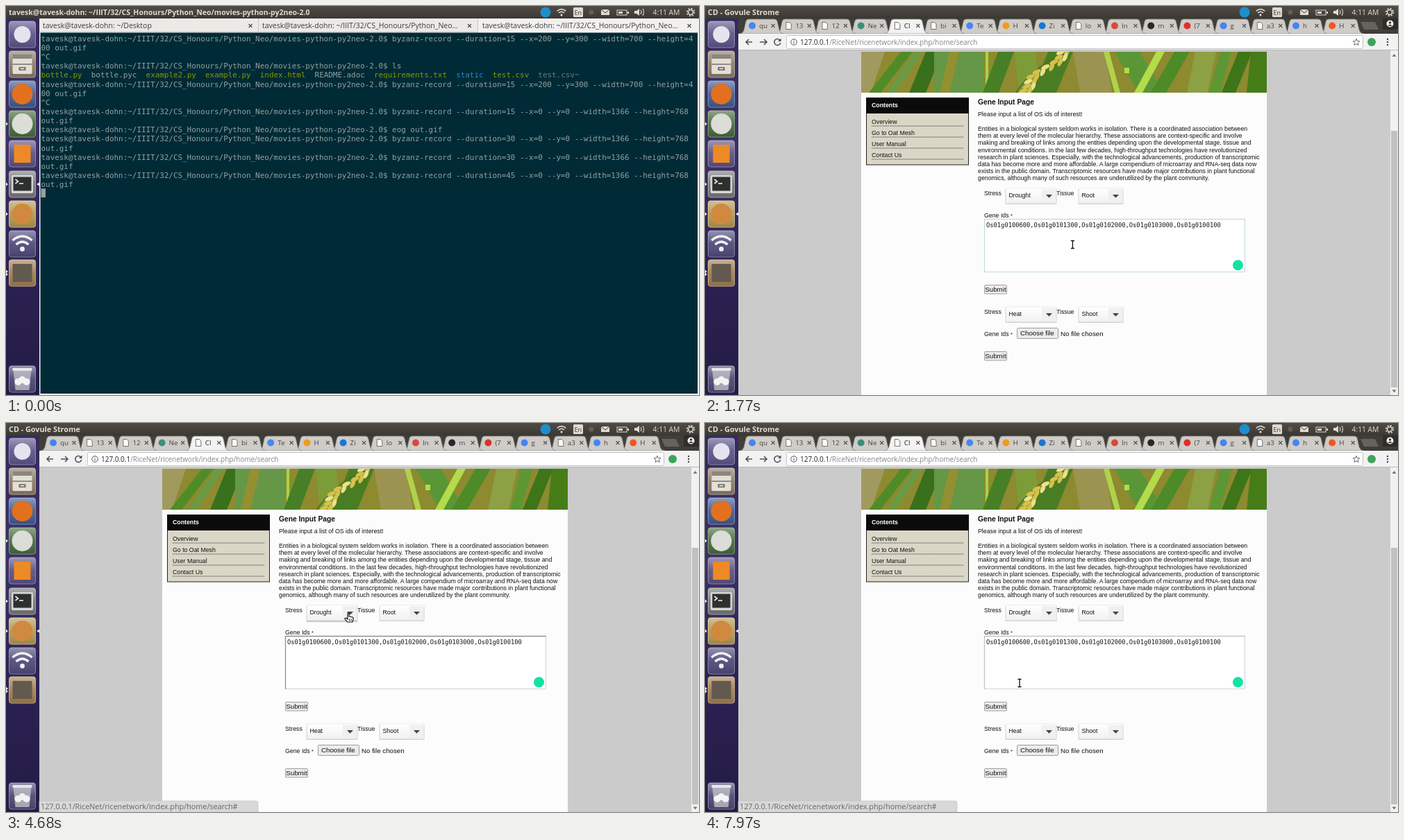
Recreate the animation shown at these times as an HTML page. Size 998 px wide and 561 px high, loop 8000 ms.

```html
<!DOCTYPE html>
<html lang="en">
<head>
<meta charset="utf-8">
<title>Gene input demo</title>
<style>
html, body { margin: 0; width: 100%; height: 100%; overflow: hidden; background: #cbcbcb; }
svg { display: block; width: 998px; height: 561px; }
text { white-space: pre; }
.ui { font-family: "Open Sans", "Noto Sans", sans-serif; }
.page { font-family: "Liberation Sans", Arial, sans-serif; }
.mono { font-family: "DejaVu Sans Mono", monospace; }
.b { font-weight: 700; }
</style>
</head>
<body>
<svg id="stage" viewBox="0 0 998 561" xmlns="http://www.w3.org/2000/svg"></svg>
<script>
const LOOP = 8000;
const rect = (x, y, w, h, fill, more = '') => `<rect x="${x}" y="${y}" width="${w}" height="${h}" fill="${fill}" ${more}/>`;
const circle = (x, y, r, fill, more = '') => `<circle cx="${x}" cy="${y}" r="${r}" fill="${fill}" ${more}/>`;
const path = (d, fill, more = '') => `<path d="${d}" fill="${fill}" ${more}/>`;
const line = (d, color, w = 1, more = '') => path(d, 'none', `stroke="${color}" stroke-width="${w}" ${more}`);
const text = (x, y, s, size, fill, cls, more = '') => `<text x="${x}" y="${y}" font-size="${size}" fill="${fill}" class="${cls}" ${more}>${s}</text>`;
const group = (inner, more = '') => `<g ${more}>${inner}</g>`;
const clamp = v => Math.max(0, Math.min(1, v));
const within = (t, spans) => spans.some(([a, b]) => t >= a && t < b);

const gradient = (id, ...stops) => `<linearGradient id="${id}" x2="0" y2="1">` +
  stops.map((c, i) => `<stop offset="${i / (stops.length - 1)}" stop-color="${c}"/>`).join('') + '</linearGradient>';
const defs = `<defs>
  ${gradient('bar', '#504c45', '#3b3833')}
  ${gradient('dock', '#352a5c', '#3c3166', '#2b2152', '#241c46')}
  ${gradient('gloss', '#ffffff66', '#ffffff10', '#00000022')}
  ${gradient('btn', '#ffffff', '#f1f1f1')}
  <linearGradient id="glass"><stop offset="0" stop-color="#4d675c"/><stop offset=".13" stop-color="#4d675c"/><stop offset=".14" stop-color="#527594"/><stop offset=".91" stop-color="#527594"/><stop offset=".92" stop-color="#4d675c"/></linearGradient>
  <clipPath id="banner">${rect(225, 66, 584, 59, '#000')}</clipPath></defs>`;

const wifiArcs = (x, y, s, color) => group(
  line('M-7 -3Q0 -9 7 -3M-4.5 0Q0 -4 4.5 0', color, 1.7) + circle(0, 3.2, 1.7, color),
  `transform="translate(${x} ${y}) scale(${s})"`);

// Dock icons, drawn around the origin in a 40 px tile
const icons = {
  home: circle(0, 0, 12, '#e6e3ee'),
  files: rect(-14, -14, 28, 28, '#e4dfd6', 'rx="2"') + rect(-14, -14, 28, 6, '#8c867c') +
    line('M-14 0H14', '#77736c', 1.5) + rect(-5, 4, 10, 5, '#6d6861', 'rx="1"') + rect(-3, 5.5, 6, 2, '#e4dfd6'),
  fox: circle(0, 0, 15, '#e2701f'),
  update: circle(0, 0, 15, '#dcdcd8'),
  cone: rect(-12, -13, 24, 26, '#ee8a25'),
  term: rect(-15.5, -13, 31, 26, '#d6d8d6', 'rx="2"') + rect(-13, -10.5, 26, 20, '#2d302f') +
    line('M-10 -7l4 3l-4 3M-4.5 -1h6', '#f4f4f4', 1.6),
  web: circle(0, 0, 15, '#cf8a3f'),
  wifi: wifiArcs(0, 1, 2, '#f1f1f4'),
  edit: rect(-14, -13, 28, 26, '#625a4e'),
  trash: path('M-13 -13H13L10 16H-10Z', '#c4c6cc', 'opacity=".75"') + rect(-14, -16, 28, 4, '#e6e7ea', 'rx="1"') +
    [-6, 0, 6].map(x => circle(x, 1 + Math.abs(x) / 2, 5, '#f3f3f3')).join('')
};
const icon = (name, x, y, s = 1) => group(icons[name], `transform="translate(${x} ${y}) scale(${s})"`);

const dockItems = [['home', 41, '#5a5488'], ['files', 84, '#8a7a66'], ['fox', 127, '#3f5a92'], ['update', 170, '#46693c'],
  ['cone', 213, '#5b5183'], ['term', 257, '#77777a'], ['web', 300, '#b29752'], ['wifi', 343, '#4d4979'],
  ['edit', 385, '#a07d4f'], ['trash', 538, '#4b4772']];
const dock = rect(0, 18, 48, 543, 'url(#dock)') + dockItems.map(([name, y, c]) =>
  rect(4, y - 19.5, 39, 39, c, 'rx="4"') + rect(4.5, y - 19, 38, 38, 'url(#gloss)', 'rx="4" stroke="#ffffff50"') + icon(name, 23.5, y)).join('') +
  [170, 257, 300, 383, 387].map(y => path(`M0 ${y - 2.5}L3 ${y}L0 ${y + 2.5}Z`, '#e8e8ee')).join('');

const tray = circle(777, 9, 7.5, '#1d8fcb') + wifiArcs(800, 10, .9, '#dfdbd2') + rect(817, 2, 14, 14, '#dfdbd2', 'rx="1.5"') +
  text(818.6, 12.8, 'En', 9, '#3b3833', 'ui') + circle(843, 9, 3.5, '#625e57') +
  rect(857, 5, 12, 8, '#dfdbd2') + line('M857 5l6 5l6 -5', '#3b3833') +
  rect(880, 6, 14, 7, 'none', 'stroke="#dfdbd2"') + rect(895, 8, 2, 3, '#dfdbd2') + rect(882, 8, 6, 3, '#dfdbd2') +
  path('M905 7h3l4 -3v10l-4 -3h-3Z', '#dfdbd2') + line('M914 6q2 3 0 6M917 4q3 5 0 10', '#dfdbd2', 1.1) +
  text(931.5, 13, '4:11 AM', 10.3, '#dfdbd2', 'ui') +
  circle(986, 9, 3.4, 'none', 'stroke="#dfdbd2" stroke-width="1.5"') + circle(986, 9, 5.3, 'none', 'stroke="#dfdbd2" stroke-width="1.8" stroke-dasharray="2 2.16"');

const cross = (x, y, c) => line(`M${x - 2.5} ${y - 2.5}l5 5m0 -5l-5 5`, c, 1.2);

// Terminal
const user = 'tavesk@tavesk-dohn:';
const folder = '~/IIIT/32/CS_Honours/Python_Neo/movies-python-py2neo-2.0';
const record = (s, x, y, w, h) => `$byzanz-record --duration=${s} --x=${x} --y=${y} --width=${w} --height=${h}`;
const full = s => [record(s, 0, 0, 1366, 768), 'out.gif'];
const small = [record(15, 200, 300, 700, 4), '00 out.gif', '^C'];
const GREEN = '#859900', GREY = '#93a1a1';
const listing = [['bottle.py', GREEN], ['bottle.pyc', GREY], ['example2.py', GREEN], ['example.py', GREEN], ['index.html', GREEN],
  ['README.adoc', GREY], ['requirements.txt', GREEN], ['static', '#268bd2'], ['test.csv', GREEN], ['test.csv~', '#657b83']]
  .map(([s, c]) => `<tspan fill="${c}">${s}</tspan>`).join('  ');
const shellLines = [...small, '$ls', listing, ...small, ...full(15), '$eog out.gif', ...full(30), ...full(30), ...full(45)];
const shellTab = (x, label, closeX) => text(x, 32, user + ' ' + label, 10.5, '#3c3c3c', 'ui') + cross(closeX, 28.5, '#4a4a4a');
const terminal = rect(48, 18, 950, 543, '#f2f1f0') + rect(48, 18, 315, 20, '#eceae7') + rect(364, 18, 315, 20, '#eceae7') +
  line('M363.5 18V38M679.5 18V38M48 37.5H680', '#c9c5bf') +
  shellTab(53, '~/Desktop', 352) + shellTab(369, '~/IIIT/32/CS_Honours/Python_Neo…', 667.5) + shellTab(686, '~/IIIT/32/CS_Honours/Python_Neo…', 984) +
  rect(49.5, 38.5, 946.5, 520.5, '#002b36') +
  shellLines.map((s, i) => text(50.5, 50.8 + i * 13.15, s.replace(/^\$/, `${user}${folder}$ `), 10.92, GREY, 'mono')).join('') +
  rect(50.5, 263.3, 6.5, 12.7, '#93a1a1', 'id="caret"') +
  text(4, 12.5, `${user} ${folder}`, 10.5, '#dfdbd2', 'ui b') + path('M48 254.5L44 257L48 259.5Z', '#e8e8ee');

// Browser window
const page = (x, y, s, more = '', size = 8.78) => text(x, y, s, size, '#111', 'page', more);
const tabLabels = ['qu', '13', '12', 'Ne', 'Cl', 'bi', 'Te', 'H', 'Zi', 'lo', 'In', 'm', '(7', 'g', 'a3', 'h', 'H'];
const tabMarks = ['#4285f4', '', '', '#3b8f7a', '', '', '#4688f1', '#f29a1f', '#1877d8', '', '#d9483b', '#24292e', '#e02f2f', '#4285f4', '', '#4285f4', '#f4561f'];
const favicon = (x, c) => c ? circle(x, 28.5, 5, c) :
  path(`M${x - 3.5} 23.5h5l2.5 2.5v7.5h-7.5Z`, '#fdfdfd', 'stroke="#666" stroke-width=".9"');
const tab = i => {
  const x = 53 + i * 52.2, on = i === 4;
  return path(`M${x - 3} 40Q${x + 1} 40 ${x + 3} 35L${x + 6} 22Q${x + 7} 19 ${x + 10} 19H${x + 47}Q${x + 50} 19 ${x + 51} 22L${x + 54} 35Q${x + 56} 40 ${x + 60} 40Z`,
    on ? '#f2f2f2' : '#cfccc8', 'stroke="#8b8985" stroke-width=".8"') + favicon(x + 15, tabMarks[i]) +
    text(x + 25, 32, tabLabels[i], 9.8, on ? '#222' : '#444', 'ui') + cross(x + 45, 28.5, '#555');
};
const order = [...tabLabels.keys()].filter(i => i !== 4).reverse().concat(4);
const address = '/RiceNet/ricenetwork/index.php/home/search';
const chromeBar = rect(48, 18, 950, 22, '#403e39') + order.map(tab).join('') + path('M944 23h21l5 11h-21Z', '#66635d') +
  rect(976, 18, 22, 16, '#2f2d2a') + circle(986.5, 25.5, 5, '#f1f1f1') + circle(986.5, 24, 1.7, '#333') + path('M983 28.8q3.5 -4 7 0Z', '#333') +
  rect(48, 40, 950, 24, '#f2f2f2') + line('M48 63.5H998', '#b9b9b9') + rect(117.5, 42.5, 830, 19, '#fff', 'rx="2" stroke="#c3c3c3"') +
  line('M68 52H59m4 -4l-4 4l4 4M79 52h10m-4 -4l4 4l-4 4', '#4e4e4e', 1.5) +
  line('M108 49.5a4.5 4.5 0 1 0 .7 3.5', '#4e4e4e', 1.5) + path('M109.5 46.5v4.5h-4.5Z', '#4e4e4e') +
  circle(128, 52, 4.3, 'none', 'stroke="#555"') + line('M128 51v3.5M128 49v1', '#555') +
  text(137, 55.5, `127.0.0.1<tspan fill="#858585">${address}</tspan>`, 9.98, '#222', 'ui') +
  path('M938 47.3l1.4 3.2l3.4 .3l-2.6 2.3l.8 3.4l-3 -1.8l-3 1.8l.8 -3.4l-2.6 -2.3l3.4 -.3Z', 'none', 'stroke="#666"') +
  circle(960, 52, 6, '#3fa35b') + [48, 52, 56].map(y => circle(983, y, 1.2, '#444')).join('');

// [top x, bottom x, width, colour] of each leaf in the banner
const leaves = [[225, 205, 34, '#a19a5e'], [282, 236, 17, '#4f8c28'], [302, 262, 12, '#6a9b44'], [318, 294, 24, '#39701c'],
  [330, 330, 72, '#659746'], [352, 338, 14, '#939032'], [404, 404, 4, '#a9d248'], [422, 400, 23, '#477f26'], [446, 452, 30, '#7c9c38'],
  [494, 470, 36, '#497d23'], [530, 540, 46, '#9b9450'], [574, 590, 8, '#b0d24b'], [590, 624, 36, '#5a9636'], [650, 618, 12, '#b4db4b'],
  [676, 642, 22, '#4c8b27'], [706, 694, 30, '#8ca044'], [742, 726, 16, '#5c9734'], [768, 744, 20, '#3e7519'], [786, 780, 40, '#467c18']];
const grains = Array.from({ length: 18 }, (_, i) => {
  const k = i >> 1, side = i % 2;
  const x = 512 - k * 7.5 + side * 9 + 6 * Math.sin(k), y = 67 + k * 7;
  return `<ellipse cx="${x}" cy="${y}" rx="6.5" ry="3" fill="${i % 3 ? '#d8c04a' : '#ece08c'}" transform="rotate(${side ? -65 : -25} ${x} ${y})"/>`;
}).join('');
const banner = group(rect(225, 66, 584, 59, '#8d8a30') +
  leaves.map(([a, b, w, c]) => path(`M${a} 66h${w}L${b + w} 125h${-w}Z`, c)).join('') + rect(604, 89, 7, 8, '#b4db4b') +
  line('M528 62Q470 88 446 128', '#566f22', 2) + grains, 'clip-path="url(#banner)"');

const links = ['Overview', 'Go to Oat Mesh', 'User Manual', 'Contact Us'];
const sidebar = rect(232.5, 132.5, 147, 96.5, '#dad7c7', 'stroke="#222"') + rect(232, 132, 148, 23, '#0b0b0b') +
  text(240, 145.5, 'Contents', 8.78, '#fff', 'page b') + links.map((s, i) => page(240, 170 + i * 16, s) +
    line(`M240 ${173 + i * 16}H372`, '#333', .9, 'stroke-dasharray="1 .7"')).join('');
const intro = `Entities in a biological system seldom works in isolation. There is a coordinated association between
them at every level of the molecular hierarchy. These associations are context-specific and involve
making and breaking of links among the entities depending upon the developmental stage, tissue and
environmental conditions. In the last few decades, high-throughput technologies have revolutionized
research in plant sciences. Especially, with the technological advancements, production of transcriptomic
data has become more and more affordable. A large compendium of microarray and RNA-seq data now
exists in the public domain. Transcriptomic resources have made major contributions in plant functional
genomics, although many of such resources are underutilized by the plant community.`.split('\n');

const select = (x, y, w, label, id = '') => rect(x - .5, y + 1, w + 1, 22.5, '#d2d2d2', 'rx="1"') +
  (id ? rect(x, y + 20, w, 4.6, '#c9c9c9', `id="${id}Lift"`) : '') +
  rect(x + .3, y + .3, w - .6, 21.8, 'url(#btn)', 'rx="1" stroke="#e3e3e3" stroke-width=".7"') + rect(x + w - 21, y + 2, 20, 19.5, '#f0f0f0') +
  page(x + 4.5, y + 13.5, label, id ? `id="${id}Value"` : '') + path(`M${x + w - 15} ${y + 9.5}h9l-4.5 4.8Z`, '#444');
const button = (x, y, w, h, label, pad) => rect(x + .5, y + .5, w - 1, h - 1, '#ececec', 'rx="1" stroke="#9d9d9d"') +
  page(x + pad, y + h / 2 + 3.4, label, '', 9.74);
const fields = (y, stress, tissue, a, b) => page(402, y + 3, 'Stress') + page(506, y + 3, 'Tissue') +
  select(433, y - 7.5, 73, stress, a) + select(538, y - 7.5, 64, tissue, b);
const required = y => page(402, y, 'Gene Ids <tspan font-size="7.5">*</tspan>');
const MENU_TOP = 285, ITEM = 18;
const menu = (id, x, w, items) => group(rect(x + .5, MENU_TOP, w - 1, ITEM * items.length, '#fdfdfd', 'stroke="#cfcfcf"') +
  rect(x + 1, MENU_TOP, w - 2, ITEM, '#e9e9e9', `id="${id}Mark"`) +
  items.map((s, i) => page(x + 4.5, MENU_TOP + 12.5 + i * ITEM, s)).join(''), `id="${id}"`);

const browser = rect(48, 64, 950, 497, '#cbcbcb') + rect(225, 64, 584, 497, '#fcfcfc') + rect(225, 64, 584, 2, '#cbcbcb') + banner + sidebar +
  page(393, 141.5, 'Gene Input Page', 'font-weight="700"', 10.25) + page(393, 159.3, 'Please input a list of OS ids of interest!') +
  intro.map((s, i) => page(393, 180 + i * 10.2, s)).join('') +
  fields(270, 'Drought', 'Root', 'stress', 'tissue') + required(304.5) +
  rect(402.5, 307.5, 375, 76, '#fff', 'stroke="#d0d0d0" rx="1"') +
  line('M402.5 384V307.5H778', '#8f8f8f', 1.3, 'id="plainEdge"') + rect(402.5, 307.5, 375, 76, 'none', 'stroke="#c3d9e0" rx="1" id="glowEdge"') +
  text(405, 319.2, ['0600', '1300', '2000', '3000', '0100'].map(n => 'Os01g010' + n).join(','), 8.77, '#111', 'mono') +
  circle(767.5, 373.7, 7.5, '#12e3a2', 'id="helper"') +
  button(402, 402, 33, 13.5, 'Submit', 1.3) + fields(441, 'Heat', 'Shoot') + required(475.5) +
  button(449, 464, 60, 16, 'Choose file', 5) + page(512, 475.6, 'No file chosen', '', 9.74) + button(402, 498, 33, 13.5, 'Submit', 1.3) +
  menu('stressMenu', 433, 73, ['Drought', 'Heat']) + menu('tissueMenu', 538, 64, ['Root', 'Shoot']) +
  group(path('M48 545H360Q363 545 363 548V561H48Z', '#d8d8d8', 'stroke="#c4c4c4" stroke-width=".7"') +
    text(50, 556.5, `127.0.0.1${address}#`, 10.8, '#666', 'ui'), 'id="status"') +
  rect(987, 64, 11, 497, '#f1f1f1') + rect(988, 180, 9, 370, '#c1c1c1') + path('M989.5 73h6l-3 -4Z', '#777') + path('M989.5 553.5h6l-3 4Z', '#777') +
  chromeBar + text(4, 12.5, 'CD - Govule Strome', 10.8, '#dfdbd2', 'ui b') + path('M48 297.5L44 300L48 302.5Z', '#e8e8ee');

// App switcher
const glassTile = (x, fill) => rect(x - 54, 226, 108, 108, fill, 'rx="9" opacity=".85"') + rect(x - 54, 226, 108, 54, '#fff', 'rx="9" opacity=".12"');
const switcher = rect(124, 201, 751, 170, '#8f9594', 'rx="5" opacity=".9"') + rect(130, 207, 738, 158, 'url(#glass)', 'rx="2" opacity=".95" stroke="#e4e8ea"') +
  glassTile(221, '#8d83ad') + rect(180, 246, 82, 64, '#6d618f', 'rx="3" opacity=".8"') + circle(233, 285, 25, '#a79fc4') +
  [262, 278, 294].map(y => rect(188, y, 14, 9, '#b8b1d0')).join('') +
  glassTile(360, '#b9bdbd') + icon('term', 360, 283, 2.7) +
  rect(432, 214, 133, 132, '#8f9699', 'rx="16"') + rect(438, 220, 121, 119, '#e3e5e5', 'rx="12"') + group(icon('web', 499, 280, 2.85), 'opacity=".8"') +
  glassTile(637, '#d0ad72') + group(icon('edit', 637, 280, 2.9), 'opacity=".6"') +
  glassTile(777, '#86a883') + icon('update', 777, 280, 2.8) +
  text(498.5, 355.5, 'Govule Strome', 9.5, '#fff', 'ui b', 'text-anchor="middle"');

const pointers = group(path('M0 0V14L3.3 11L5.8 16.5L8 15.5L5.6 10.2H10Z', '#fff', 'stroke="#222"'), 'id="arrow"') +
  group(path('M-1 1Q0 -1 1 1V5L6 6Q7.5 6.4 7 9L6 13H-1.5L-5 8.5Q-5 6.5 -3 7.5L-1 9Z', '#fff', 'stroke="#111" stroke-width="1.2"') + line('M1.5 8.5v3M4 8.5v3', '#111'), 'id="hand"') +
  group(line('M-3 -5.5H3M-3 5.5H3M0 -5.5V5.5', '#fff', 3) + line('M-2.5 -5.5H2.5M-2.5 5.5H2.5M0 -5.5V5.5', '#111', 1.3), 'id="beam"');

document.getElementById('stage').innerHTML = defs + rect(0, 0, 998, 18, 'url(#bar)') + dock +
  group(terminal, 'id="terminal"') + group(browser, 'id="browser"') + tray +
  group(pointers, 'id="mouse"') + group(switcher, 'id="switcher"');
const $ = id => document.getElementById(id);
const show = (id, on) => { $(id).style.display = on ? '' : 'none'; };

const SWITCH = 970;
// Pointer stops: time, x, y
const stops = [[470, 512, 262], [590, 496, 275], [660, 489, 271], [1240, 489, 271], [1810, 530, 345], [2000, 530, 345],
  [2250, 566, 267], [2500, 566, 267], [2700, 574, 335], [2870, 574, 303], [3050, 524, 270], [3420, 545, 429], [3960, 545, 429],
  [4200, 540, 345], [4450, 493, 274], [4685, 493, 274], [4730, 491, 285], [4970, 480, 328], [5170, 468, 295], [5340, 468, 295],
  [5440, 500, 318], [5620, 592, 270], [5810, 592, 270], [6150, 576, 314], [6340, 574, 304], [6760, 574, 304], [7050, 578, 270],
  [7100, 578, 270], [7220, 576, 268], [7740, 576, 268], [7820, 562, 294], [7950, 453, 375]];
// Menus open on a click and close on the next one
const menus = [
  { id: 'stressMenu', left: 433, right: 506, spans: [[4790, 5360]] },
  { id: 'tissueMenu', left: 538, right: 602, spans: [[5850, 6500], [7540, 7820]] }
];

function mouseAt(t) {
  const i = stops.findIndex(s => s[0] > t);
  if (i === 0) return stops[0].slice(1);
  if (i < 0) return stops[stops.length - 1].slice(1);
  const [t0, x0, y0] = stops[i - 1], [t1, x1, y1] = stops[i];
  const k = (t - t0) / (t1 - t0), e = k * k * (3 - 2 * k);
  return [x0 + (x1 - x0) * e, y0 + (y1 - y0) * e];
}
const inBox = (x, y) => x > 402 && x < 778 && y > 306 && y < 384;
const overSelect = (m, x, y) => x >= m.left && x <= m.right && y >= 262 && y <= 286;
const overMenu = (m, t, x, y) => within(t, m.spans) && x >= m.left && x <= m.right && y >= MENU_TOP && y < MENU_TOP + 2 * ITEM;

function pointerKind(t, x, y) {
  if (t < SWITCH) return 'beam';
  if (menus.some(m => overSelect(m, x, y) || overMenu(m, t, x, y))) return 'hand';
  return inBox(x, y) ? 'beam' : 'arrow';
}
// The box highlight fades, so it averages the recent hover states
function glow(t) {
  const past = Array.from({ length: 10 }, (_, i) => t - i * 20);
  return past.filter(p => {
    const [x, y] = mouseAt(p);
    return p > SWITCH && inBox(x, y) && !menus.some(m => overMenu(m, p, x, y));
  }).length / past.length;
}

function render(t) {
  const inBrowser = t >= SWITCH;
  show('terminal', !inBrowser);
  show('browser', inBrowser);
  show('caret', t < 590);
  show('switcher', t >= 840 && t < 1060);
  $('switcher').setAttribute('opacity', clamp((t - 800) / 80) * clamp((1100 - t) / 130));

  const [x, y] = mouseAt(t), kind = pointerKind(t, x, y);
  show('mouse', t >= 490);
  $('mouse').setAttribute('transform', `translate(${x} ${y})`);
  for (const k of ['arrow', 'hand', 'beam']) show(k, k === kind);
  if (!inBrowser) return;

  const g = glow(t);
  $('plainEdge').setAttribute('opacity', 1 - g * .8);
  $('glowEdge').setAttribute('opacity', g);
  show('helper', t >= 1600);
  show('status', within(t, [[2130, 2610], [4430, 6780], [7150, LOOP]]));
  show('stressLift', t > 1260 && overSelect(menus[0], x, y));
  show('tissueLift', overSelect(menus[1], x, y));
  $('tissueValue').textContent = within(t, [[6500, 7820]]) ? 'Shoot' : 'Root';

  for (const m of menus) {
    show(m.id, within(t, m.spans));
    show(m.id + 'Mark', overMenu(m, t, x, y));
    $(m.id + 'Mark').setAttribute('y', y < MENU_TOP + ITEM ? MENU_TOP : MENU_TOP + ITEM);
  }
}

const start = performance.now();
function tick() {
  render((performance.now() - start) % LOOP);
  requestAnimationFrame(tick);
}
tick();
</script>
</body>
</html>
```
